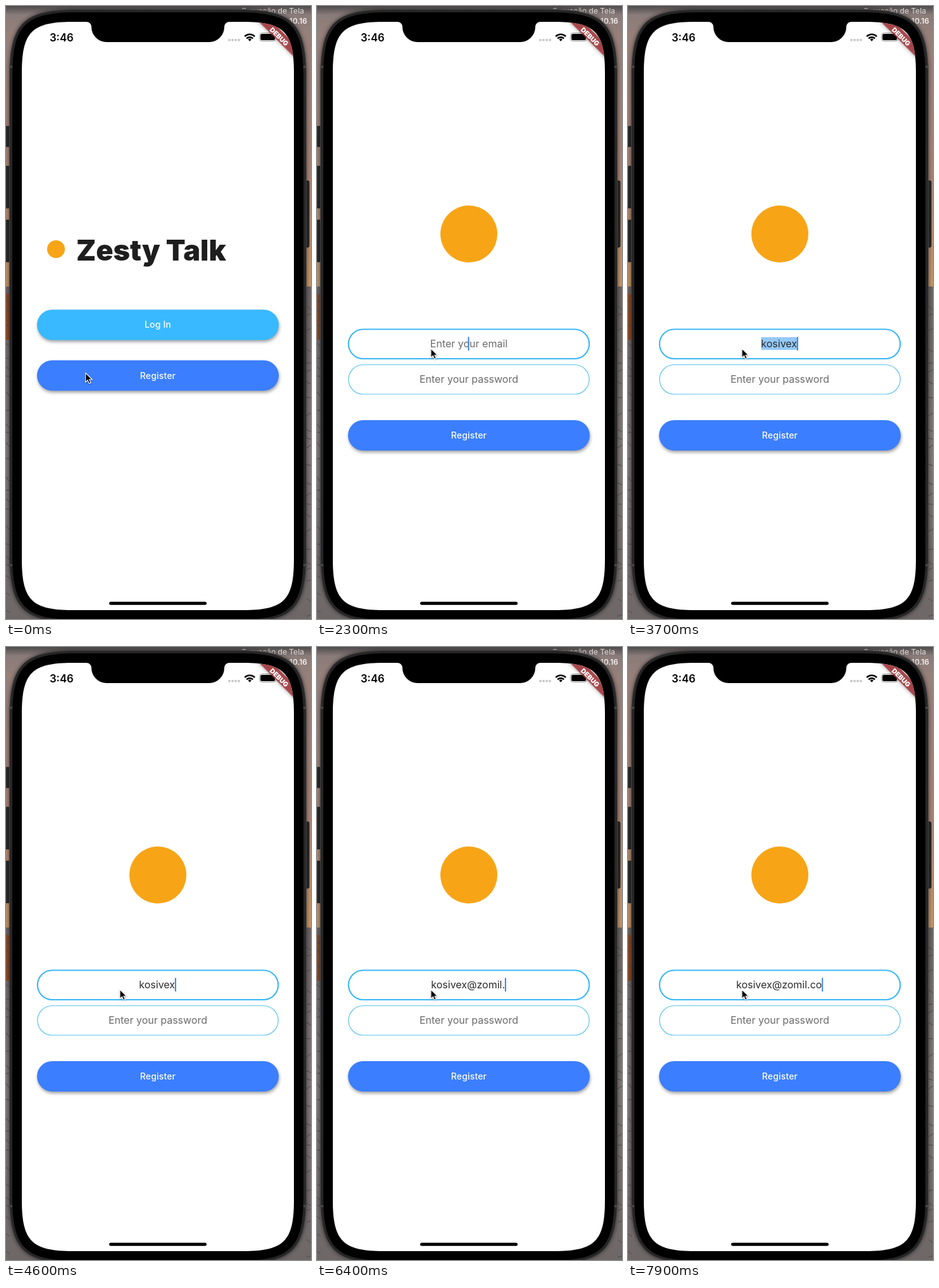
An HTML page for the animation above (8000 ms loop, 482 by 968 pixels).

```html
<!DOCTYPE html>
<html lang="en">
<head>
<meta charset="utf-8">
<style>
  html, body { margin: 0; width: 100%; height: 100%; overflow: hidden; background: #000; }
  svg { display: block; width: 482px; height: 968px; font-family: Inter, Roboto, sans-serif; }
  .mid { text-anchor: middle; }
  .btn { filter: drop-shadow(1px 3px 2.5px rgba(0, 0, 0, .36)); }
  .label { fill: #fff; font-size: 14px; font-weight: 500; letter-spacing: .15px; }
  .field { fill: #fff; stroke: #5cc4ee; stroke-width: 1.2; }
  .field.focus { stroke: #3cb8f8; stroke-width: 2.1; }
  .hint { fill: #6b6b6b; font-size: 16px; }
</style>
</head>
<body>
<svg viewBox="0 0 482 968">
  <defs>
    <linearGradient id="sky" x2="0" y2="1">
      <stop offset="0" stop-color="#837a79"/>
      <stop offset=".1" stop-color="#96807a"/>
      <stop offset=".6" stop-color="#aa8375"/>
      <stop offset="1" stop-color="#c69564"/>
    </linearGradient>
    <linearGradient id="rock" x2="0" y2="1">
      <stop offset="0" stop-color="#6d6364"/>
      <stop offset=".5" stop-color="#81797a"/>
      <stop offset="1" stop-color="#6e6768"/>
    </linearGradient>
    <linearGradient id="top" x2="0" y2="1">
      <stop offset="0" stop-color="#4f4b4b"/>
      <stop offset="1" stop-color="#4f4b4b" stop-opacity="0"/>
    </linearGradient>
    <clipPath id="screen"><path id="glass"/></clipPath>
  </defs>

  <!-- desktop -->
  <rect width="482" height="446" fill="url(#sky)"/>
  <rect y="443" width="482" height="525" fill="url(#rock)"/>
  <path d="M0 453l6 4v70H0z" fill="#8b4a26"/>
  <path id="cracks" stroke="#514949" fill="none"/>
  <rect width="482" height="14" fill="url(#top)"/>
  <g fill="#d3cdcc" font-size="12" font-weight="500" text-anchor="end">
    <text x="471" y="12">Gravação de Tela</text>
    <text x="476" y="28" font-weight="600" fill="#f3f0ef">10.16</text>
  </g>

  <!-- phone -->
  <g fill="#2b2b2c" stroke="#111" stroke-width=".8">
    <rect x="-2" y="190" width="9" height="32" rx="2"/>
    <rect x="-2" y="253" width="9" height="66" rx="2"/>
    <rect x="-2" y="338" width="9" height="66" rx="2"/>
    <rect x="473" y="276" width="6" height="105" rx="2"/>
  </g>
  <path id="shell" fill="#262627" stroke="#454546" style="filter:drop-shadow(0 0 3px rgba(0,0,0,.55))"/>
  <path d="M6 96h5M6 883h5M469 96h5M469 883h5" stroke="#4a4a4a" stroke-width="3"/>
  <path id="bezel"/>

  <g clip-path="url(#screen)">
    <rect x="25" y="25" width="430" height="929" fill="#fff"/>

    <g id="welcome">
      <circle cx="79" cy="384" r="14" fill="#f7a516"/>
      <text x="111" y="402" font-size="45" font-weight="900" fill="#1e1e1e">Zesty Talk</text>
      <rect class="btn" x="49" y="479.5" width="382" height="48" rx="24" fill="#39b9ff"/>
      <text class="mid label" x="240" y="508">Log In</text>
      <rect class="btn" x="49" y="559.5" width="382" height="48" rx="24" fill="#3b7eff"/>
      <text class="mid label" x="240" y="588.5">Register</text>
    </g>

    <g id="form">
      <circle cx="240" cy="360" r="45" fill="#f7a516"/>
      <rect id="email" class="field" x="49.8" y="510.5" width="380.4" height="46.5" rx="23.2"/>
      <rect class="field" x="49.8" y="566.5" width="380.4" height="46.5" rx="23.2"/>
      <text id="hint" class="mid hint" x="240" y="538.5">Enter your email</text>
      <text class="mid hint" x="240" y="594.5">Enter your password</text>
      <rect id="selection" y="523" height="20" fill="#94c9f7"/>
      <text id="typed" class="mid" x="238.7" y="538.5" font-size="16" fill="#2b2b2b"></text>
      <rect id="caret" y="522.5" width="2" height="21.5" fill="#3a82e8"/>
      <rect class="btn" x="49" y="654" width="382" height="48" rx="24" fill="#3b7eff"/>
      <text class="mid label" x="240" y="683">Register</text>
    </g>

    <!-- status bar -->
    <text x="69" y="55.5" font-size="16.7" font-weight="600">3:46</text>
    <path d="M353 53.7h.01m4.99 0h.01m4.99 0h.01m4.99 0h.01" stroke="#c9c9cb" stroke-width="4" stroke-linecap="round"/>
    <g fill="none" stroke="#000" stroke-width="2.5">
      <path d="M377.3 48.2a11 11 0 0 1 15.8 0M380.2 51.3a7 7 0 0 1 10 0"/>
      <path d="M382.5 52.8a4 4 0 0 1 5.4 0l-2.7 3z" fill="#000" stroke="none"/>
    </g>
    <rect x="400.5" y="42.5" width="26" height="13" rx="4" fill="none" stroke="#999"/>
    <rect x="402" y="44" width="23" height="10" rx="2.5"/>
    <g transform="translate(431.5 48.5) rotate(45)">
      <rect x="-60" y="-9" width="120" height="14.8" fill="#a83c41" fill-opacity=".9"
        style="filter:drop-shadow(0 0 3px rgba(0,0,0,.45))"/>
      <text class="mid" y="3.6" font-size="10.5" font-weight="900" fill="#fff">DEBUG</text>
    </g>
    <rect x="163" y="940.7" width="154" height="5" rx="2.5"/>
  </g>
  <path d="M127 24v1a8 8 0 0 1 8 8a24 24 0 0 0 24 24h162a24 24 0 0 0 24-24a8 8 0 0 1 8-8v-1z"/>

  <path id="pointer" d="M0 0v14.5l3.4-3.2 2.3 5.3 2.6-1.1-2.3-5.2h4.6z" stroke="#fff" stroke-width="1.1"
    style="filter:drop-shadow(0 1px 1px rgba(0,0,0,.35))"/>
</svg>

<script>
const $ = id => document.getElementById(id);
const LOOP = 8000, OPEN = 900, FOCUS = 2200, SELECT = 3700, DESELECT = 4500;
const address = "kosivex@zomil.co";
const keys = [2600, 2800, 2900, 3100, 3200, 3400, 3500, 4900,
              5600, 5800, 5900, 6100, 6200, 6400, 7000, 7700];

// rectangle with continuous corners that reach e along each side
function squircle(id, x, y, w, h, e) {
  const c = e * .2, f = e - c;
  $(id).setAttribute("d", `M${x + e} ${y}h${w - 2 * e}c${f} 0 ${e} ${c} ${e} ${e}
    v${h - 2 * e}c0 ${f} ${-c} ${e} ${-e} ${e}h${2 * e - w}c${-f} 0 ${-e} ${-c} ${-e} ${-e}
    v${2 * e - h}c0 ${-f} ${c} ${-e} ${e} ${-e}z`);
}
squircle("shell", 5.5, 5.5, 469, 968, 108);
squircle("bezel", 10, 10, 460, 959, 101);
squircle("glass", 25, 25, 430, 929, 80);

let cracks = "";
for (let i = 0; i < 24; i++) {
  const y = 465 + i * 21 + 7 * Math.sin(i * 5);
  cracks += `M0 ${y}l6 ${4 + 4 * Math.sin(i * 3)}M475 ${y + 9}l7 ${5 * Math.cos(i * 2)}`;
}
$("cracks").setAttribute("d", cracks);

const show = (id, on) => $(id).style.display = on ? "" : "none";

function draw(t) {
  show("welcome", t < OPEN);
  show("form", t >= OPEN);

  const p = Math.min(1, Math.max(0, (t - 1200) / 800));
  const ease = p * p * (3 - 2 * p);
  $("pointer").setAttribute("transform", `translate(${125.7 + 54.3 * ease} ${579.5 - 38.5 * ease})`);

  const focused = t >= FOCUS;
  $("email").classList.toggle("focus", focused);

  const count = keys.filter(k => k <= t).length;
  const typed = $("typed");
  typed.textContent = address.slice(0, count);
  show("hint", !count);

  const width = count ? typed.getComputedTextLength() : 0;
  const selected = t >= SELECT && t < DESELECT;
  show("selection", selected);
  $("selection").setAttribute("x", 238.7 - width / 2);
  $("selection").setAttribute("width", width);

  // the blink restarts at every change of the text or selection
  const last = Math.max(FOCUS, ...[...keys, SELECT, DESELECT].filter(k => k <= t));
  show("caret", focused && (t - last) % 1000 < 500);
  $("caret").setAttribute("x", 238.5 + width / 2);
}

const start = performance.now();
function tick() {
  const t = (performance.now() - start) % LOOP;
  draw(Math.floor(t / 100) * 100);
  requestAnimationFrame(tick);
}
tick();
</script>
</body>
</html>
```
